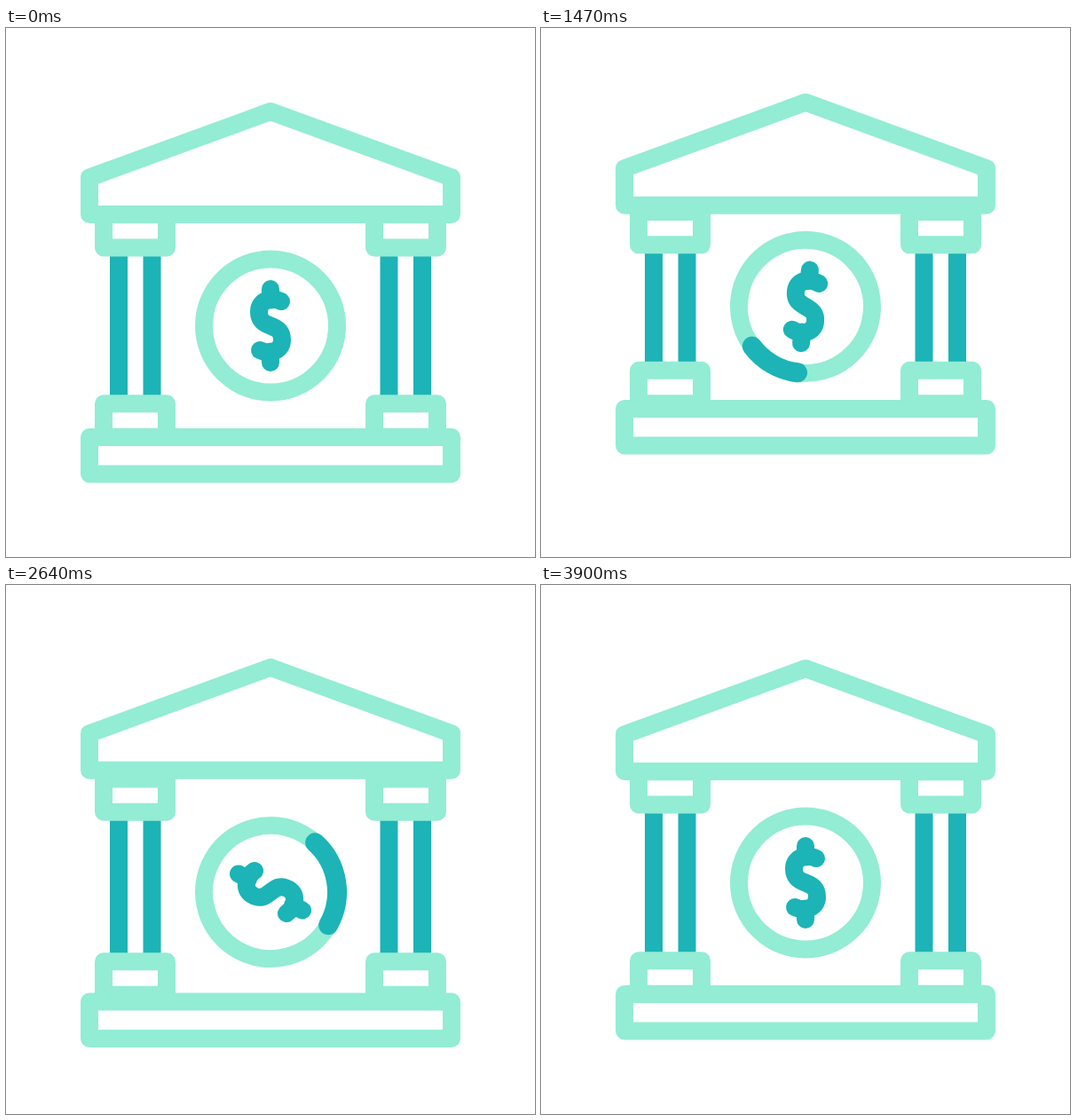
Recreate the animation shown at these times as an HTML page. Size 596 by 596 pixels, loop 4.5 s.

```html
<!DOCTYPE html>
<html lang="en">
<head>
<meta charset="utf-8">
<title>Bank</title>
<style>
  html, body { margin: 0; width: 100%; height: 100%; overflow: hidden; background: #fff; }
  svg { display: block; width: 100vw; height: 100vh; }
  .light, .teal { fill: none; stroke-width: 20; stroke-linecap: round; stroke-linejoin: round; }
  .light { stroke: #93ecd4; }
  .teal { stroke: #1cb4b6; }
  .solid { fill: #fff; }
  #columns { stroke-linecap: butt; }
  #arc { stroke-width: 22; }
</style>
</head>
<body>
<svg viewBox="0 0 596 596">
  <path id="columns" class="teal"/>
  <g id="caps">
    <path class="light solid" d="M110 210.2h71v37.3h-71zM415 210.2h71v37.3h-71z"/>
  </g>
  <g id="bases">
    <path class="light solid" d="M110 423.2h71v37.5h-71zM415 423.2h71v37.5h-71z"/>
  </g>
  <g id="slab">
    <path class="light solid" d="M94 461H502V502.5H94z"/>
  </g>
  <g id="roof">
    <path id="rays" class="teal"/>
    <path class="light solid" d="M94 210V168.5L298 94L502 168.5V210z"/>
  </g>
  <g id="coin">
    <circle class="light" r="75"/>
    <path id="arc" class="teal"/>
    <path class="teal" d="M0 -41.5V-29M0 29V41.5M12 -27.5C3 -32 -13 -30 -13 -16C-13 -4 -5 -2.5 0 0C5 2.5 13 4 13 16C13 30 -3 32 -12 27.5"/>
  </g>
</svg>
<script>
const LOOP = 4500, STEP = 30;
const el = id => document.getElementById(id);
const parts = ["columns", "caps", "bases", "slab", "roof", "rays", "coin", "arc"];
const ui = Object.fromEntries(parts.map(id => [id, el(id)]));

const mix = (a, b, k) => a + (b - a) * k;

function ease(t, from, to) {
  const k = Math.min(1, Math.max(0, (t - from) / (to - from)));
  return k * k * (3 - 2 * k);
}

function track(t, times, values) {
  let i = 0;
  while (i < times.length - 2 && t >= times[i + 1]) i++;
  return mix(values[i], values[i + 1], ease(t, times[i], times[i + 1]));
}

const beats = [300, 1200, 2100, 3000, 3900];
const coinBeats = [300, 1350, 2250, 3150, 3900];
const moves = {
  roof: [0, 0, -47.6, 24, 0],
  caps: [0, 0, -14.5, 20.5, 0],
  bases: [0, -47, -2.3, 3, 0],
  slab: [0, -47.5, 24.3, 0, 0]
};
const coinLift = [0, -24, 24, -9.7, 0];
const coinTurn = [0, 151, 317, 12.6, 0];

// Each ray runs outward from the roof: x0, y0, x1, y1.
const rayLines = [
  [408, 111.8, 406, 74.4],
  [441.5, 113.7, 455, 80.5],
  [466, 134.7, 493, 113]
];

function rayPath(a, b) {
  if (b - a < 0.002) return "";
  return rayLines.map(([x0, y0, x1, y1]) => {
    const at = k => mix(x0, x1, k) + " " + mix(y0, y1, k);
    return `M${at(a)}L${at(b)}`;
  }).join("");
}

function arcPath(a, b) {
  if (b - a < 0.002) return "";
  const at = k => {
    const w = (k - 0.25) * 2 * Math.PI;
    return 75 * Math.cos(w) + " " + 75 * Math.sin(w);
  };
  return `M${at(a)}A75 75 0 0 1 ${at((a + b) / 2)}A75 75 0 0 1 ${at(b)}`;
}

function draw(t) {
  const y = {};
  for (const id in moves) {
    y[id] = track(t, beats, moves[id]);
    ui[id].setAttribute("transform", `translate(0 ${y[id]})`);
  }
  ui.columns.setAttribute("d", [127, 164.5, 431.5, 469]
    .map(x => `M${x} ${247 + y.caps}V${424 + y.bases}`).join(""));

  const lift = track(t, coinBeats, coinLift);
  const turn = track(t, beats, coinTurn);
  ui.coin.setAttribute("transform", `translate(298 ${335.5 + lift}) rotate(${turn})`);

  ui.arc.setAttribute("d", arcPath(ease(t, 1800, 3000), ease(t, 1200, 2400)));
  ui.rays.setAttribute("d", rayPath(ease(t, 1800, 2250), ease(t, 1650, 2100)));
}

let start = null;
function tick(now) {
  if (start === null) start = now;
  const t = (now - start) % LOOP;
  draw(Math.floor(t / STEP + 1e-6) * STEP);
  requestAnimationFrame(tick);
}
draw(0);
requestAnimationFrame(tick);
</script>
</body>
</html>
```
